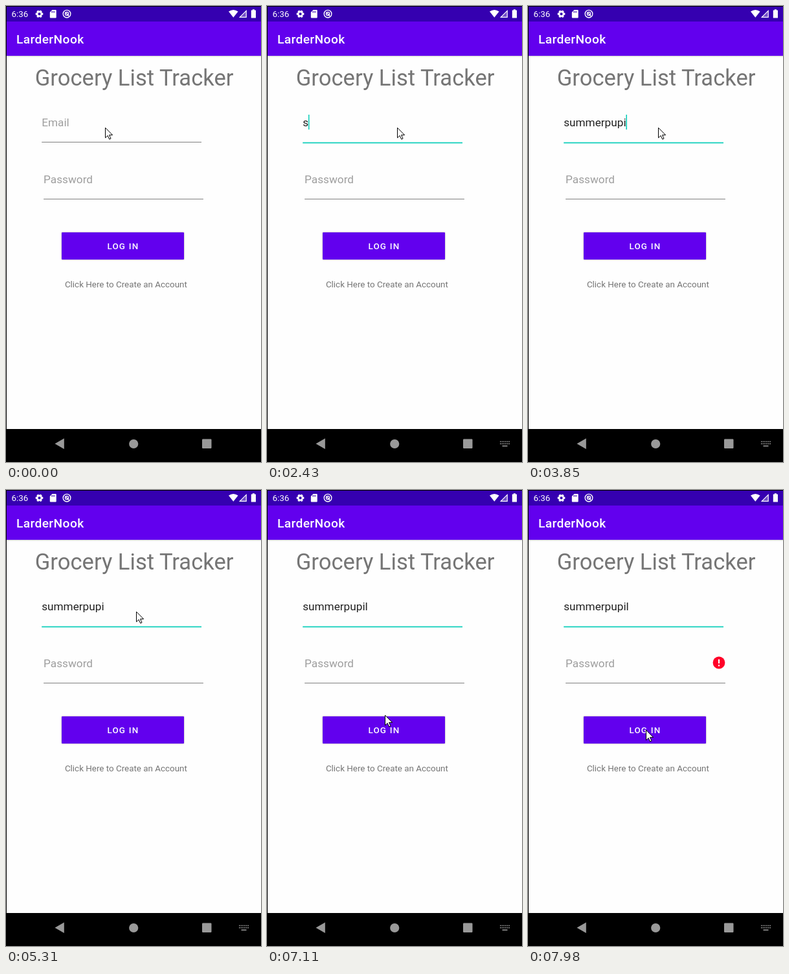
Write an HTML page that moves like this. It is 394x705 px and loops after 8000 ms.

```html
<!DOCTYPE html>
<html lang="en">
<head>
<meta charset="utf-8">
<title>Grocery List Tracker</title>
<style>
  html, body { margin: 0; width: 100%; height: 100%; overflow: hidden; background: #000; }
  svg { display: block; width: 394px; height: 705px; font-family: Roboto, sans-serif; }
  .field { font-size: 17.2px; }
  .hint { fill: #9e9e9e; }
  .small { font-size: 13.4px; }
  .medium { font-weight: 500; fill: #fff; }
  #login { filter: drop-shadow(0 .6px .8px rgba(0, 0, 0, .35)); }
  #login.pressed { filter: drop-shadow(0 1.5px 1.5px rgba(0, 0, 0, .45)); }
</style>
</head>
<body>
<svg viewBox="0 0 394 705">
  <defs>
    <linearGradient id="fade" x2="0" y2="1">
      <stop stop-opacity=".16"/>
      <stop offset="1" stop-opacity="0"/>
    </linearGradient>
    <clipPath id="button"><rect x="86" y="350" width="189" height="42"/></clipPath>
  </defs>
  <rect width="394" height="705"/>
  <rect x="1" y="1" width="393" height="23" fill="#3500b0"/>
  <rect x="1" y="24" width="393" height="53" fill="#6200ee"/>
  <rect x="1" y="77" width="393" height="577" fill="#fefefe"/>
  <rect x="1" y="77" width="393" height="2.5" fill="url(#fade)"/>

  <!-- Status bar -->
  <text class="small" x="8.4" y="17.3" fill="#fff">6:36</text>
  <g fill="none" stroke="#fff">
    <circle cx="51.5" cy="12.3" r="3.4" stroke-width="2.6"/>
    <circle cx="51.5" cy="12.3" r="5" stroke-width="1.7" pathLength="12" stroke-dasharray="1.2 .8" stroke-dashoffset=".6"/>
    <circle cx="94" cy="12.2" r="5.8" stroke-width="1.4"/>
    <circle cx="94" cy="12" r="2.6" stroke-width="1.3"/>
    <path d="M92 10l5 5.4" stroke-width="1.5"/>
    <path d="M361.3 17.3h9.9v-9.9z" stroke-width="1.2" fill="#fff" fill-opacity=".3"/>
  </g>
  <g fill="#fff">
    <path d="M71.5 6h5.2q1 0 1 1v10.4q0 1-1 1h-7.9q-1 0-1-1V9.7z"/>
    <path d="M344 8.4q7.3-5 14.6 0l-7.3 9.4z"/>
    <path d="M380.8 6.5V5.2h3.2v1.3h2v12h-7.2v-12z"/>
  </g>
  <path d="M70.8 8v2.4M72.8 8v2.4M74.8 8v2.4" stroke="#3500b0"/>

  <text class="medium" x="15.9" y="58" font-size="19.2" letter-spacing=".4">LarderNook</text>
  <text x="44.8" y="123.4" font-size="34.6" fill="#757575">Grocery List Tracker</text>

  <text class="field" id="email" x="55.2" y="186"></text>
  <rect id="emailLine" x="55.2" width="246.8"/>
  <rect id="caret" y="168" width="1.6" height="23" fill="#10cfbb"/>
  <text class="field hint" x="58.1" y="274">Password</text>
  <rect x="58.1" y="298" width="246.8" height="1" fill="#808080"/>
  <g id="error">
    <circle cx="295" cy="267" r="9.4" fill="#ff0028"/>
    <path d="M295 261.8v6.4M295 270.2v2.2" stroke="#fff" stroke-width="2.2"/>
  </g>

  <rect id="login" x="86" y="350" width="189" height="42" rx="1" fill="#6200ee"/>
  <circle id="ripple" cx="182" cy="371" fill="#fff" clip-path="url(#button)"/>
  <text class="small medium" x="156.4" y="376" letter-spacing="1.2">LOG IN</text>
  <text class="small" x="90.9" y="434.5" fill="#757575">Click Here to Create an Account</text>

  <!-- Navigation bar -->
  <g fill="#999">
    <path d="M89.8 668.5v16.6l-14.3-8.3z"/>
    <circle cx="197.2" cy="677" r="7.1"/>
    <rect x="303" y="669.5" width="14.5" height="14.5" rx="1.2"/>
  </g>
  <g id="keyboard" stroke="#999" stroke-width="1.6">
    <path d="M360 673.5h15M360 676.8h15" stroke-dasharray="1.6 1.08"/>
    <path d="M363.5 680.3h8"/>
  </g>

  <path id="pointer" d="M.5 1.2V16.8L4.2 13.4 6.7 19 9 18 6.6 12.4H11.6Z" fill="#fff" stroke="#000"/>
</svg>
<script>
const LOOP = 8000;
const ENTRY = "summerpupil";
const FOCUS = 420, PRESS = 7480, ERROR = 7620;
const CARET_ON = [[FOCUS, 810], [1400, 1810], [2430, 4280], [4720, 5310], [5590, 6150], [6650, 7110], [7600, 7980]];

const [email, emailLine, caret, error, login, ripple, keyboard, pointer] =
  ["email", "emailLine", "caret", "error", "login", "ripple", "keyboard", "pointer"]
    .map(id => document.getElementById(id));

const clamp = v => Math.min(1, Math.max(0, v));
const show = (el, on) => el.setAttribute("visibility", on ? "visible" : "hidden");
const set = (el, attrs) => Object.entries(attrs).forEach(([k, v]) => el.setAttribute(k, v));

// Progress in equal jumps, the first one happening at the start time
const steps = (t, start, gap, count) => clamp((Math.floor((t - start) / gap) + 1) / count);

function typedCount(t) {
  if (t < 2430) return 0;
  if (t < 3570) return Math.min(8, 1 + Math.floor((t - 2430) / 141.4));
  return t < 3850 ? 9 : t < 5590 ? 10 : 11;
}

function pointerAt(t) {
  if (t < 6150) return [153 + 48 * steps(t, 300, 120, 2), 187];
  if (t < 7230) {
    const p = steps(t, 6150, 137, 8), u = p * p * (3 - 2 * p), v = 1 - u;
    const curve = (a, b, c) => v * v * a + 2 * v * u * b + u * u * c;
    return [curve(201, 272, 182), curve(187, 240, 347)];
  }
  return [182, 347 + 23 * steps(t, 7230, 120, 3)];
}

function draw(t) {
  const focused = t >= FOCUS, count = typedCount(t);
  email.textContent = count ? ENTRY.slice(0, count) : "Email";
  email.setAttribute("fill", count ? "#212121" : "#9e9e9e");
  set(emailLine, focused
    ? { y: 210.6, height: 1.8, fill: "#10cfbb" }
    : { y: 210, height: 1, fill: "#808080" });

  caret.setAttribute("x", 55 + (count ? email.getComputedTextLength() : 0));
  show(caret, CARET_ON.some(([on, off]) => t >= on && t < off));
  show(keyboard, t >= 550);
  show(error, t >= ERROR);

  const press = clamp((t - PRESS) / 480), pressed = press > 0 && press < 1;
  set(ripple, { r: 20 + 240 * press, "fill-opacity": pressed ? 0.24 * (1 - press) : 0 });
  login.classList.toggle("pressed", pressed);

  const [x, y] = pointerAt(t);
  pointer.setAttribute("transform", `translate(${Math.round(x)} ${Math.round(y)})`);
}

function tick() {
  draw(performance.now() % LOOP);
  requestAnimationFrame(tick);
}
tick();
</script>
</body>
</html>
```
